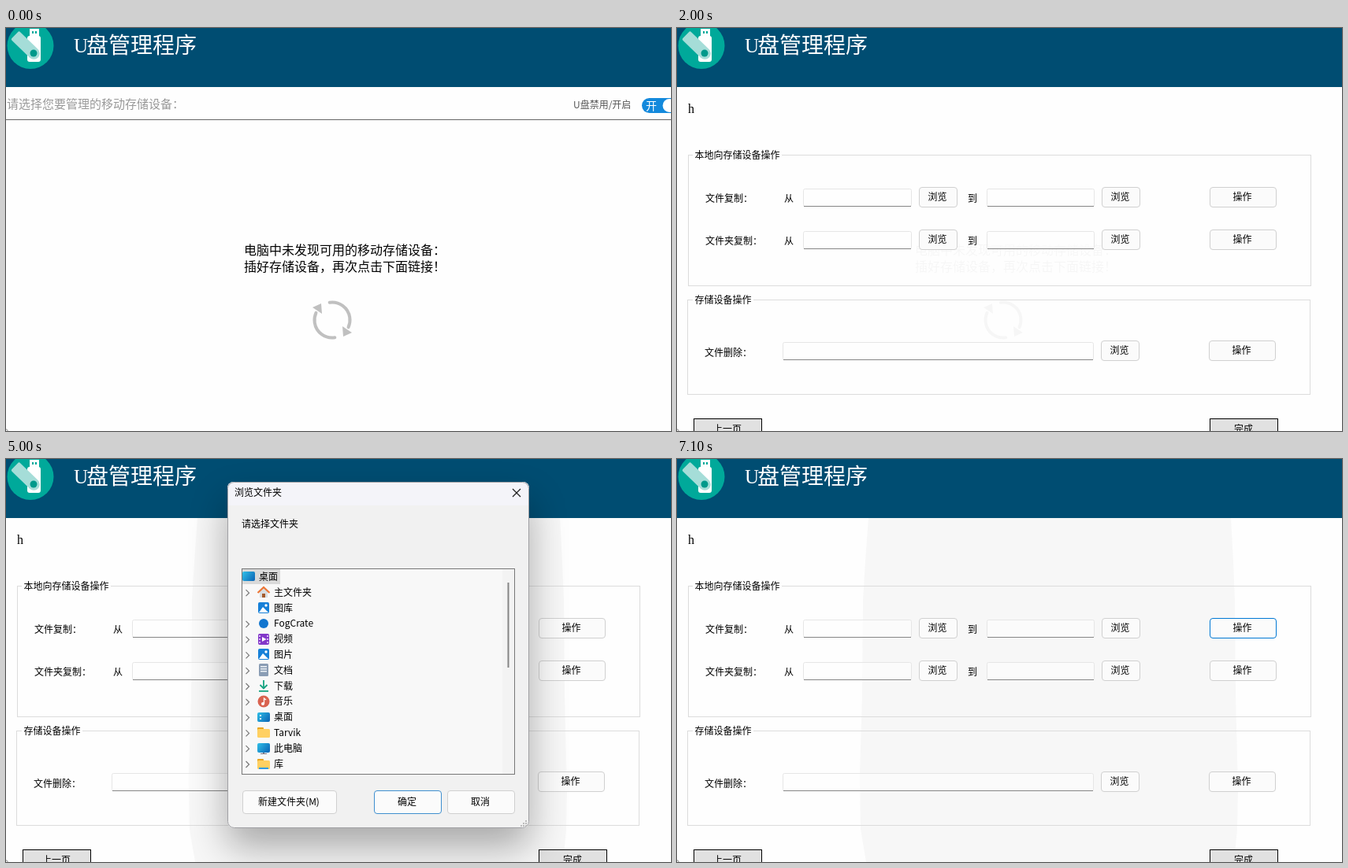
Animation, 844 px wide and 512 px high, one loop 7.8 s. Source, as an HTML page with a canvas:

```html
<!DOCTYPE html>
<html lang="zh-CN">
<head>
<meta charset="utf-8">
<title>U盘管理程序</title>
<style>
html, body { margin: 0; width: 100%; height: 100%; overflow: hidden; background: #fefefe; }
canvas { display: block; }
</style>
</head>
<body>
<canvas id="stage" width="844" height="512"></canvas>
<script>
const LOOP = 7800;
const SANS = '"Noto Sans CJK SC", "Noto Sans CJK", "Noto Sans", sans-serif';
const SERIF = '"Liberation Serif", serif';
const c = document.getElementById('stage').getContext('2d');

// Progress in 100 ms steps: 0 before start, 1 on the n-th step.
const steps = (t, start, n) => Math.max(0, Math.min(1, (Math.floor((t - start) / 100) + 1) / n));

function text(s, x, y, size = 12, color = '#000', align = 'left', font = SANS, weight = 400) {
  c.font = `${weight} ${size}px ${font}`;
  c.fillStyle = color;
  c.textAlign = align;
  c.fillText(s, x, y);
}
function rect(x, y, w, h, color) {
  c.fillStyle = color;
  c.fillRect(x, y, w, h);
}
function round(x, y, w, h, r, fill, stroke) {
  c.beginPath();
  c.roundRect(x, y, w, h, r);
  if (fill) { c.fillStyle = fill; c.fill(); }
  if (stroke) { c.strokeStyle = stroke; c.lineWidth = 1; c.stroke(); }
}
function frame(x, y, w, h, color) {
  c.strokeStyle = color;
  c.lineWidth = 1;
  c.strokeRect(x + .5, y + .5, w - 1, h - 1);
}
function poly(points, fill) {
  c.beginPath();
  for (let i = 0; i < points.length; i += 2) c.lineTo(points[i], points[i + 1]);
  c.fillStyle = fill;
  c.fill();
}
function line(points, color, width = 1) {
  c.beginPath();
  for (let i = 0; i < points.length; i += 2) c.lineTo(points[i], points[i + 1]);
  c.strokeStyle = color;
  c.lineWidth = width;
  c.stroke();
}
function disc(x, y, r, color) {
  c.beginPath();
  c.arc(x, y, r, 0, 7);
  c.fillStyle = color;
  c.fill();
}
function layer(alpha, draw) {
  c.save();
  c.globalAlpha = alpha;
  draw();
  c.restore();
}
function button(label, x, y, w, h = 26, border = '#d0d0d0', fill = '#fbfbfb') {
  round(x + .5, y + .5, w - 1, h - 1, 3.5, fill, border);
  text(label, x + w / 2 - 1, y + h / 2 + 4, 12, '#000', 'center');
}
function cross(x, y, color) {
  line([x - 5, y - 5, x + 5, y + 5], color, 1.2);
  line([x - 5, y + 5, x + 5, y - 5], color, 1.2);
}

function header() {
  rect(0, 0, 844, 75, '#004d72');
  disc(31, 22.5, 29.5, '#00a99a');
  rect(30, 1, 12, 10, '#fff');
  rect(33, 4, 2, 3, '#00a99a');
  rect(37, 4, 2, 3, '#00a99a');
  round(27, 10, 17, 33, 3, '#fff');
  c.save();
  c.translate(35, 32);
  c.rotate(-.8);
  round(-7.5, -33, 15, 41, [2, 2, 8, 8], '#a5ddd8');
  c.restore();
  disc(35, 32, 4.5, '#00998b');
  text('U', 86, 31, 25, '#fff', 'left', SERIF);
  text('盘管理程序', 102, 32, 28, '#fff', 'left', SANS, 500);
}

function emptyNotice() {
  text('电脑中未发现可用的移动存储设备：', 302, 288, 16);
  text('插好存储设备，再次点击下面链接！', 302, 309, 16);
}
function refreshIcon(color) {
  c.strokeStyle = color;
  c.lineWidth = 4;
  c.lineCap = 'round';
  for (const a of [0, Math.PI]) {
    c.beginPath();
    c.arc(414, 371, 22.5, a - 1.72, a + .42);
    c.stroke();
  }
  c.lineCap = 'butt';
  poly([427, 379, 439, 387, 428, 392], color);
  poly([401, 363, 389, 355, 400, 350], color);
}

function listHead() {
  text('请选择您要管理的移动存储设备：', 1, 102, 15, '#999');
  text('U盘禁用/开启', 720, 102, 12, '#555');
  round(807, 89, 48, 19, 9.5, '#1389dc');
  text('开', 812, 103.5, 14, '#fff');
  disc(842, 98.5, 8.5, '#fff');
}
function deviceRow(hover) {
  if (hover) rect(0, 131, 844, 85, '#00bfff');
  round(22, 150, 50, 47, 4, '#d5dde2');
  round(23, 142, 49, 47, [5, 5, 1, 1], '#0a8fdc');
  rect(54, 191, 7, 3, '#8cc63f');
  round(31, 154, 20, 18, 3, '#fff');
  rect(50, 157, 12, 12, '#fff');
  rect(39, 158, 2, 10, '#0a8fdc');
  rect(44, 158, 2, 10, '#0a8fdc');
  rect(56, 159, 3, 3, '#0a8fdc');
  rect(56, 164, 3, 3, '#0a8fdc');
  text('h', 104, 156, 14, '#000', 'left', SERIF);
  text('空间', 107, 192, 12, '#222');
  text('8.41G可用，共58.59G的空间', 161, 192, 12.2, '#222');
  button('在系统中打开', 691, 165, 98, 31);
}

function field(x, y, w, focus = 0) {
  round(x + .5, y + .5, w - 1, 22, 2, 'rgba(255,255,255,.5)', '#e6e6e6');
  rect(x + 1, y + 22, w - 2, 1, '#868686');
  if (!focus) return;
  layer(focus, () => rect(x + 1, y + 21, w - 2, 2, '#2a6fb5'));
  rect(x + 3, y + 4, 1, 15, '#000');
}
function group(title, x, y, w, h) {
  frame(x, y, w, h, '#dcdcdc');
  rect(20, y, title.length * 12 + 5, 1, '#fefefe');
  text(title, 22.5, y + 5);
}
function form(t) {
  const stage = steps(t, 1800, 3) * 3;
  if (!stage) return;
  text('h', 14, 108, 16, '#000', 'left', SERIF);
  group('本地向存储设备操作', 14, 161, 791, 167);
  group('存储设备操作', 13, 345, 791, 121);
  if (stage < 2) return;

  const typing = t >= 3700 && t < 4600;
  ['文件复制：', '文件夹复制：'].forEach((label, i) => {
    const y = 204 + i * 54;
    text(label, 36, y + 17);
    text('从', 136, y + 17);
    text('到', 369, y + 17);
    field(160, y, 138);
    field(393, y, 137);
  });
  text('文件删除：', 35, 417);
  field(134, 399, 395, typing ? .7 + .3 * steps(t, 3700, 4) : 0);
  if (stage < 3) return;

  const blue = '#0078d4', tint = '#e8f2fb';
  const pickOn = t >= 4500 && t < 6000;
  const pickHover = t >= 4300 && t < 4900;
  const runOn = t >= 6000;
  const runHover = t >= 5900 && t < 6100;
  for (const y of [202, 256]) {
    const second = y > 202;
    button('浏览', 307, y, 49);
    button('浏览', 539, y, 49, 26, second && (pickOn || pickHover) ? blue : '#d0d0d0',
      second && pickHover ? tint : '#fbfbfb');
    button('操作', 676, y, 85, 26, !second && (runOn || runHover) ? blue : '#d0d0d0',
      !second && runHover ? tint : '#fbfbfb');
  }
  button('浏览', 538, 397, 49);
  button('操作', 675, 397, 85);
  for (const [label, x] of [['上一页', 21], ['完成', 676]]) {
    rect(x, 496, 87, 26, '#e1e1e1');
    frame(x, 496, 87, 26, '#000');
    text(label, x + 43, 514, 12, '#000', 'center');
  }
}

// Pale veil left around the folder window.
function veil() {
  poly([243, 75, 239, 130, 236, 180, 235, 300, 232, 400, 233, 470, 240, 512,
    707, 512, 711, 470, 712, 420, 709, 300, 708, 180, 706, 130, 703, 75], '#f7f7f7');
}

function panel(x, y, w, h, fill) {
  c.save();
  c.shadowColor = 'rgba(0,0,0,.32)';
  c.shadowBlur = 48;
  c.shadowOffsetY = 24;
  round(x, y, w, h, 8, fill);
  c.restore();
}
function closeBox(x, y, heat) {
  layer(heat, () => round(x - 16, y - 14, 31, 28, [0, 8, 0, 0], '#c42b1c'));
  cross(x, y, heat > .5 ? '#fff' : '#222');
}

// Tree icons, each drawn in a 16 px box.
const folder = () => {
  round(0, 2, 8, 6, 1, '#e9a520');
  round(0, 4, 16, 11, 1.5, '#ffd062');
};
const picture = () => {
  round(1, 1, 14, 14, 2, '#1680d8');
  poly([2, 14, 7, 7, 14, 14], '#fff');
  disc(11, 5, 1.7, '#fff');
};
const desk = () => {
  const g = c.createLinearGradient(0, 2, 16, 14);
  g.addColorStop(0, '#31c0e8');
  g.addColorStop(1, '#0a62b4');
  round(0, 2, 16, 12, 2, g);
};
const icons = {
  home() {
    poly([3, 7, 8, 3, 13, 7, 13, 15, 3, 15], '#d9dde0');
    rect(6, 10, 4, 5, '#a45b2d');
    line([.5, 9, 8, 2, 15.5, 9], '#ec7636', 2.2);
  },
  picture,
  disc() { disc(8, 8, 6, '#1276cf'); },
  video() {
    round(1, 1, 14, 14, 2, '#8338c9');
    poly([6, 5, 11.5, 8, 6, 11], '#fff');
    for (const y of [3, 7, 11]) { rect(2, y, 2, 2, '#d6b3f5'); rect(12, y, 2, 2, '#d6b3f5'); }
  },
  doc() {
    round(2, 0, 12, 16, 1.5, '#8a9db4');
    for (const y of [3, 6, 9]) rect(4, y, 8, 1.5, '#eef3f8');
  },
  down() {
    line([8, 1, 8, 11], '#15a381', 1.8);
    line([3.5, 7, 8, 11.5, 12.5, 7], '#15a381', 1.8);
    rect(2, 14, 12, 1.8, '#15a381');
  },
  music() {
    disc(8, 8, 7.5, '#d9624f');
    disc(7, 11, 2, '#fff');
    line([8.5, 11, 8.5, 4, 11, 6], '#fff', 1.3);
  },
  desk() { desk(); rect(3, 5, 2, 2, '#fff'); rect(3, 9, 2, 2, '#fff'); },
  pc() { desk(); rect(7, 14, 2, 2, '#778'); rect(4, 15, 8, 1, '#778'); },
  folder,
  lib() { folder(); rect(2, 13, 12, 2, '#2f9be0'); }
};
const tree = [
  ['主文件夹', 'home'], ['图库', 'picture', true], ['FogCrate', 'disc'], ['视频', 'video'],
  ['图片', 'picture'], ['文档', 'doc'], ['下载', 'down'], ['音乐', 'music'],
  ['桌面', 'desk'], ['Tarvik', 'folder'], ['此电脑', 'pc'], ['库', 'lib']
];

function folderWindow(t) {
  panel(281, 29, 383, 440, '#f1f1f1');
  round(281, 29, 383, 30, [8, 8, 0, 0], '#f4f4f9');
  round(281.5, 29.5, 382, 439, 8, null, '#a0a0a4');
  text('浏览文件夹', 290, 47);
  closeBox(648, 43, steps(t, 5300, 2));
  text('请选择文件夹', 299, 87);
  rect(299, 139, 347, 262, '#f8f8f8');
  frame(299, 139, 347, 262, '#777');
  rect(630, 140, 15, 260, '#f3f3f3');
  rect(300, 140, 48, 19, '#d9d9d9');
  c.save();
  c.translate(300, 141);
  desk();
  c.restore();
  text('桌面', 321, 153.5);
  tree.forEach(([name, icon, leaf], i) => {
    const y = 169.2 + i * 19.8;
    if (!leaf) line([304.5, y - 3, 308.5, y + 1, 304.5, y + 5], '#777', 1.2);
    c.save();
    c.translate(319, Math.round(y) - 8);
    icons[icon]();
    c.restore();
    text(name, 340, y + 4.5);
  });
  rect(636.5, 157, 2, 108, '#858585');
  button('新建文件夹(M)', 300, 421, 120, 30);
  button('确定', 467, 421, 86, 30, '#3f8fcf');
  button('取消', 560, 421, 86, 30);
  for (let i = 0; i < 3; i++)
    for (let j = 0; j <= i; j++) rect(659 - j * 3, 459 + i * 3, 2, 2, '#bbb');
}

function messageBox(t) {
  panel(389, 195, 168, 155, '#fff');
  round(389, 195, 168, 29, [8, 8, 0, 0], '#f4f4f9');
  round(389, 302, 168, 48, [0, 0, 8, 8], '#f0f0f0');
  round(389.5, 195.5, 167, 154, 8, null, '#a0a0a4');
  closeBox(543, 208, steps(t, 6700, 1));
  text('操作失败！', 401, 267);
  button('确定', 461, 313, 84, 26, '#3f8fcf');
}

function popup(alpha, cx, cy, draw) {
  if (alpha <= 0) return;
  layer(alpha, () => {
    const s = .94 + .06 * alpha;
    c.translate(cx, cy);
    c.scale(s, s);
    c.translate(-cx, -cy);
    draw();
  });
}

function render(t) {
  rect(0, 0, 844, 512, '#fefefe');
  header();
  c.beginPath();
  c.arc(-1, 513, 3.5, -1.5, 0);
  c.strokeStyle = '#888';
  c.lineWidth = 1;
  c.stroke();

  if (t < 1600) listHead();
  if (t < 500) {
    rect(0, 116, 844, 1, '#666');
    emptyNotice();
    refreshIcon('#c0c0c0');
  } else if (t < 4900) {
    layer(.03, () => { emptyNotice(); refreshIcon('#000'); });
  }
  if (t >= 500 && t < 1600) deviceRow(t >= 1100);
  if (t >= 4900) veil();
  form(t);

  const opened = t < 4900 ? 0 : t < 5000 ? .5 : 1;
  popup(opened - steps(t, 5600, 2), 472, 249, () => folderWindow(t));
  popup(steps(t, 6200, 3) - steps(t, 6900, 3), 473, 272, () => messageBox(t));
}

const begin = performance.now();
function tick() {
  render((performance.now() - begin) % LOOP);
  requestAnimationFrame(tick);
}
tick();
</script>
</body>
</html>
```
